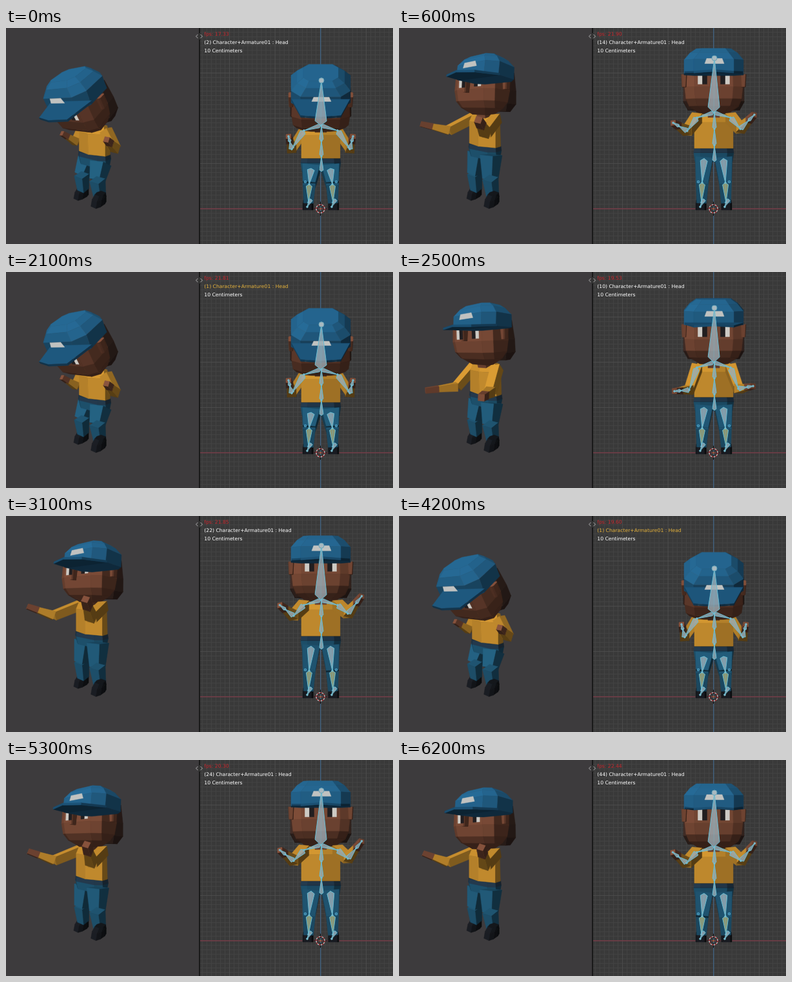
An HTML page with a canvas for the animation above (6300 ms loop, 600x337 px).

```html
<!DOCTYPE html>
<html lang="en">
<head>
<meta charset="utf-8">
<title>Character pose</title>
<style>
html, body { margin: 0; width: 100%; height: 100%; overflow: hidden; background: #3d3b3d; }
canvas { display: block; }
</style>
</head>
<body>
<canvas id="stage" width="600" height="337"></canvas>
<script>
const ctx = document.getElementById('stage').getContext('2d');
const LOOP = 6300, STEP = 100, CYCLE = 44, KEYFRAMES = [1, 29];

const C = {
  hat: [33, 92, 130], brim: [27, 78, 112], badge: [192, 194, 192],
  skin: [118, 72, 53], hair: [62, 43, 37], white: [205, 202, 196], black: [33, 30, 32],
  shirt: [188, 134, 44], pants: [32, 86, 115], belt: [35, 56, 74], shoe: [23, 26, 31]
};

// One model, two cameras. World units are front-view pixels: y up, z towards the viewer.
const SIDE = { turn: .7, dist: 330, zoom: .88, eye: 163, x: 132, y: 122 };
const FRONT = { turn: 0, dist: 1e6, zoom: 1, eye: 0, x: 488, y: 282 };
const LIGHT = [-.4, .6, .7];

const clamp = (v, lo = 0, hi = 1) => Math.min(hi, Math.max(lo, v));
const mix = (a, b, k) => Array.isArray(a) ? a.map((v, i) => mix(v, b[i], k)) : a + (b - a) * k;
const add = (a, b) => a.map((v, i) => v + b[i]);
const sub = (a, b) => a.map((v, i) => v - b[i]);
const dot = (a, b) => a.reduce((sum, v, i) => sum + v * b[i], 0);
const cross = ([a, b, c], [d, e, f]) => [b * f - c * e, c * d - a * f, a * e - b * d];
const unit = v => v.map(c => c / (Math.hypot(...v) || 1));
const mean = pts => pts.reduce(add).map(v => v / pts.length);

// Motion: crouch, swing up through the pass, overshoot, settle.
const CROUCH = { hip: 79, neck: 130, back: 8, pitch: .6, tilt: 0, elbow: [45, 93, -8], hand: [50, 113, 24] };
const PASS = { hip: 87, neck: 141, back: 3, pitch: .05, tilt: 4, elbow: [38, 99, 30], hand: [59, 100, 78] };
const SETTLE = { hip: 90, neck: 146, back: 0, pitch: 0, tilt: 7, elbow: [42, 123, 47], hand: [60, 145, 81] };

function poseAt(frame) {
  const rise = clamp((frame - 2) / 8) ** 1.6;
  const reach = Math.sin(clamp((frame - 10) / 7) * Math.PI / 2);
  const over = frame < 17 ? 1.8 * clamp((frame - 10) / 7) : 1.8 * clamp((29 - frame) / 12) ** 1.1;
  const pose = {};
  for (const key in CROUCH) pose[key] = mix(mix(CROUCH[key], PASS[key], rise), SETTLE[key], reach);
  const lift = 5 * over;
  pose.hip += lift;
  pose.neck += lift;
  pose.pitch -= .07 * over;
  pose.elbow = add(pose.elbow, [0, lift, lift / 2]);
  pose.hand = add(pose.hand, [0, lift, lift]);
  pose.knee = 38 + lift / 2;
  return pose;
}

function jointsOf(pose, side) {
  const z = -pose.back, lean = side * pose.tilt;
  const shoulder = [side * 26, pose.neck - 8, z];
  const elbow = [side * pose.elbow[0], pose.elbow[1] + lean / 4, pose.elbow[2]];
  const hand = [side * pose.hand[0] + lean / 2 * side * side, pose.hand[1] + lean, pose.hand[2]];
  return {
    shoulder, elbow, hand, wrist: mix(elbow, hand, .6),
    hip: [side * 15, pose.hip - 16, z], knee: [side * 18, pose.knee, 5], ankle: [side * 19, 10, 0]
  };
}

// Octagonal cross-section; cx and cz set the size of the cut corners.
function ring(y, w, front, back, cx = w / 3, cz = 8) {
  const half = [[w, back + cz], [w, front - cz], [w - cx, front]];
  const right = [[w - cx, back], ...half], left = right.map(([x, z]) => [-x, z]).reverse();
  return [...right, ...left].map(([x, z]) => [x, y, z]);
}

function loft(...rings) {
  const faces = [rings[0], rings[rings.length - 1]];
  for (let r = 1; r < rings.length; r++)
    rings[r].forEach((p, i) => {
      const j = (i + 1) % rings[r].length;
      faces.push([rings[r - 1][i], rings[r - 1][j], rings[r][j], p]);
    });
  return faces;
}

function limb(p, q, startWidth, endWidth) {
  const axis = unit(sub(q, p));
  const a = unit(cross(axis, [1, 0, 0])), b = cross(axis, a);
  const square = (c, w) => [[1, 1], [1, -1], [-1, -1], [-1, 1]].map(([u, v]) =>
    c.map((n, i) => n + w * (u * a[i] + v * b[i])));
  return loft(square(p, startWidth), square(q, endWidth));
}

const mapFaces = (faces, fn) => faces.map(face => face.map(fn));

function headParts() {
  const plate = (x, y, w, h, z, slant = 0) =>
    [[[x - slant, y, z], [x + w + slant, y, z], [x + w, y + h, z], [x, y + h, z]]];
  const visor = y => [[-45, 61, 20], [-31, 59, 62], [0, 61, 69], [31, 59, 62], [45, 61, 20]]
    .map(p => add(p, [0, y, 0]));
  const parts = [
    ['hair', loft(ring(72, 44, 5, -32), ring(40, 47, 8, -35), ring(18, 47, 8, -36), ring(5, 40, 0, -30))],
    ['skin', loft(ring(68, 44, 38, -18), ring(38, 45, 39, -18), ring(20, 43, 36, -16),
      ring(9, 38, 28, -10), ring(-2, 22, 14, -6))]
  ];
  for (const s of [-1, 1]) {
    parts.push(['skin', mapFaces(loft(ring(40, 3, 8, -4, 1, 2), ring(59, 4, 9, -5, 1, 2)), p => add(p, [s * 46, 0, 0]))]);
    parts.push(['white', plate(s * 21 - 3.5, 42, 7, 18, 39.5)]);
    parts.push(['black', plate(s * 14 - 3.5, 42, 7, 18, 39.5)]);
  }
  parts.push(
    ['hat', loft(ring(60, 46, 41, -36, 15, 16), ring(81, 46, 39, -36, 15, 16),
      ring(92, 37, 32, -30, 14, 14), ring(99, 27, 22, -24, 9, 9))],
    ['brim', loft(visor(2), visor(-1))],
    ['badge', plate(-11, 74, 24, 8, 42, 3)]
  );
  return parts;
}

function buildBody(pose) {
  const solids = [], z = -pose.back;
  const solid = (color, faces, anchor = mean(faces.flat()), bias = 0) => solids.push({ color, faces, anchor, bias });
  const at = (dx, dz) => p => add(p, [dx, 0, dz]);

  const cos = Math.cos(pose.pitch), sin = Math.sin(pose.pitch);
  const onHead = ([x, y, dz]) => [x, pose.neck + y * cos - dz * sin, dz * cos + y * sin];
  headParts().forEach(([color, faces], i) => solid(color, mapFaces(faces, onHead), onHead([0, 45, 5]), i * .01));

  const { hip, neck } = pose;
  solid('skin', limb([0, neck - 6, z], [0, neck + 10, 2], 9, 9));
  solid('shirt', mapFaces(loft(ring(neck - 1, 25, 12, -13, 25, 8), ring(neck - 15, 30, 17, -15, 30, 10),
    ring(hip, 30, 16, -16, 30, 9)), at(0, z)));
  solid('belt', mapFaces(loft(ring(hip, 30, 16, -16), ring(hip - 7, 31, 16, -16)), at(0, z)));
  solid('pants', mapFaces(loft(ring(hip - 7, 31, 16, -16), ring(hip - 21, 29, 13, -14)), at(0, z)));

  for (const side of [-1, 1]) {
    const j = jointsOf(pose, side);
    solid('shirt', limb(j.shoulder, j.elbow, 8, 7));
    solid('shirt', limb(j.elbow, j.wrist, 7, 4.5));
    solid('skin', limb(j.wrist, j.hand, 5, 4));
    solid('pants', limb(j.hip, j.knee, 13.5, 9.5));
    solid('pants', limb(j.knee, j.ankle, 9.5, 7.5));
    solid('shoe', mapFaces(loft(ring(14, 7, 9, -9), ring(8, 8, 15, -10), ring(-2, 8, 18, -10)), at(side * 20, 0)));
  }
  return solids;
}

function toCamera(view, [x, y, z]) {
  const c = Math.cos(view.turn), s = Math.sin(view.turn);
  return [x * c - z * s, y - view.eye, x * s + z * c];
}

function project(view, [x, y, depth]) {
  const scale = view.zoom * view.dist / (view.dist - depth);
  return [view.x + x * scale, view.y - y * scale];
}

function fillPath(pts, fill, stroke = fill, width = .5) {
  ctx.beginPath();
  pts.forEach(p => ctx.lineTo(...p));
  ctx.closePath();
  ctx.fillStyle = fill;
  ctx.fill();
  ctx.strokeStyle = stroke;
  ctx.lineWidth = width;
  ctx.lineJoin = 'round';
  ctx.stroke();
}

function drawSolid(view, { color, faces }) {
  const cam = mapFaces(faces, p => toCamera(view, p)), center = mean(cam.flat());
  const flat = faces.length === 1;
  cam.map(face => ({ face, mid: mean(face) })).sort((a, b) => a.mid[2] - b.mid[2]).forEach(({ face, mid }) => {
    let normal = unit(cross(sub(face[2], face[0]), sub(face[3], face[1])));
    const toEye = sub([0, 0, view.dist], mid);
    if (dot(normal, flat ? toEye : sub(mid, center)) < 0) normal = normal.map(v => -v);
    if (dot(normal, toEye) <= 0) return;
    const shade = flat ? 1 : .45 + .72 * Math.max(0, dot(normal, LIGHT));
    fillPath(face.map(p => project(view, p)), `rgb(${C[color].map(v => v * shade).join()})`);
  });
}

function drawBody(view, solids) {
  const key = s => toCamera(view, s.anchor)[2] + s.bias;
  [...solids].sort((a, b) => key(a) - key(b)).forEach(s => drawSolid(view, s));
}

function line(x1, y1, x2, y2, color, width = 1) {
  ctx.beginPath();
  ctx.moveTo(x1, y1);
  ctx.lineTo(x2, y2);
  ctx.strokeStyle = color;
  ctx.lineWidth = width;
  ctx.stroke();
}

function dotMark(x, y, r, fill, stroke) {
  ctx.beginPath();
  ctx.arc(x, y, r, 0, 7);
  ctx.fillStyle = fill;
  ctx.fill();
  ctx.strokeStyle = stroke;
  ctx.lineWidth = 1;
  ctx.stroke();
}

function bone(from, to, half, fill = 'rgba(158,172,181,.8)') {
  const [p, q] = [from, to].map(v => project(FRONT, toCamera(FRONT, v)));
  const [dx, dy] = sub(q, p), len = Math.hypot(dx, dy) || 1;
  const nx = -dy / len * half, ny = dx / len * half, wide = mix(p, q, .1);
  fillPath([p, add(wide, [nx, ny]), q, sub(wide, [nx, ny])], fill, '#68bdd3', 1);
  line(...p, ...q, 'rgba(104,189,211,.5)', .6);
  dotMark(...q, 1.3, '#9fb4bc', '#68bdd3');
}

function drawArmature(pose) {
  const { neck, hip, pitch } = pose, base = [0, neck, 0];
  const spine = i => [1, mix(neck, hip - 21, i / 3), 0];
  for (let i = 0; i < 3; i++) bone(spine(i + 1), spine(i), 3);
  for (const side of [-1, 1]) {
    const j = jointsOf(pose, side);
    bone(base, j.shoulder, 3);
    bone(j.shoulder, j.elbow, 4.5);
    bone(j.elbow, j.wrist, 4);
    bone(j.wrist, j.hand, 2.5);
    bone(j.hip, j.knee, 5.5);
    bone(j.knee, j.ankle, 4.5, 'rgba(168,170,120,.8)');
    bone(add(j.ankle, [4, 5, 0]), add(j.ankle, [-2, -7, 0]), 3);
    dotMark(488 + side * 24, 240, 1.8, '#36789a', '#4fa4c7');
  }
  const tip = [1, neck + 85 * Math.cos(pitch), 0];
  bone(base, tip, 9);
  dotMark(...project(FRONT, tip), 4, '#a9b9c0', '#69a5b9');
}

function drawBackground() {
  ctx.fillStyle = '#3d3b3d';
  ctx.fillRect(0, 0, 300, 337);
  ctx.fillStyle = '#393939';
  ctx.fillRect(300, 0, 300, 337);
  for (const major of [false, true])
    for (let i = -40; i <= 40; i++) {
      if ((i % 10 === 0) !== major) continue;
      const gap = i * 7.06, color = major ? '#4d4d4d' : '#444';
      if (gap > -187) line(487.8 + gap, 0, 487.8 + gap, 337, color);
      line(301, 282 + gap, 600, 282 + gap, color);
    }
  line(301, 282, 600, 282, '#8a3446');
  line(487.8, 0, 487.8, 337, '#3f6c94');
}

function drawCursor() {
  const x = 487.5, y = 282;
  for (let i = 0; i < 4; i++) {
    const c = Math.cos(i * Math.PI / 2), s = Math.sin(i * Math.PI / 2);
    line(x + c * 4, y + s * 4, x + c * 11, y + s * 11, '#111');
  }
  for (let i = 0; i < 16; i++) {
    ctx.beginPath();
    ctx.arc(x, y, 6.5, i * Math.PI / 8, (i + 1) * Math.PI / 8);
    ctx.strokeStyle = i % 2 ? '#dedada' : '#c92f35';
    ctx.lineWidth = 1.2;
    ctx.stroke();
  }
  dotMark(x, y, 1, '#d88743', '#9a5030');
}

function drawDivider() {
  line(300, 0, 300, 337, '#191919', 2);
  ctx.fillStyle = '#333';
  ctx.fillRect(298, 8, 4, 10);
  for (const s of [-1, 1])
    for (const up of [-3, 3]) line(299.5 + s * 2, 13 + up, 299.5 + s * 5, 13, '#aaa');
}

function drawLabels(step, frame) {
  const fps = 21 + 1.6 * Math.sin(step * 12.9898) - 3.67 * Math.exp(-step);
  ctx.font = '7.65px "DejaVu Sans", sans-serif';
  const text = (str, y, color) => {
    ctx.fillStyle = color;
    ctx.fillText(str, 307.3, y);
  };
  text(`fps: ${fps.toFixed(2)}`, 12, '#c8282e');
  text(`(${frame}) Character+Armature01 : Head`, 25, KEYFRAMES.includes(frame) ? '#e5b23c' : '#fff');
  text('10 Centimeters', 38, '#fff');
}

// Playback speed drifts slightly: three cycles per loop.
function frameAt(t) {
  const count = 2.2 + 3 * CYCLE * t / LOOP - .6 * Math.sin(Math.PI * t / LOOP);
  return (Math.floor(count) - 1) % CYCLE + 1;
}

function draw(now) {
  const step = Math.floor(now % LOOP / STEP);
  const frame = frameAt(step * STEP), pose = poseAt(frame), body = buildBody(pose);
  drawBackground();
  drawBody(SIDE, body);
  drawBody(FRONT, body);
  drawArmature(pose);
  drawCursor();
  drawDivider();
  drawLabels(step, frame);
}

const start = performance.now();
function tick() {
  draw(performance.now() - start);
  requestAnimationFrame(tick);
}
tick();
</script>
</body>
</html>
```
